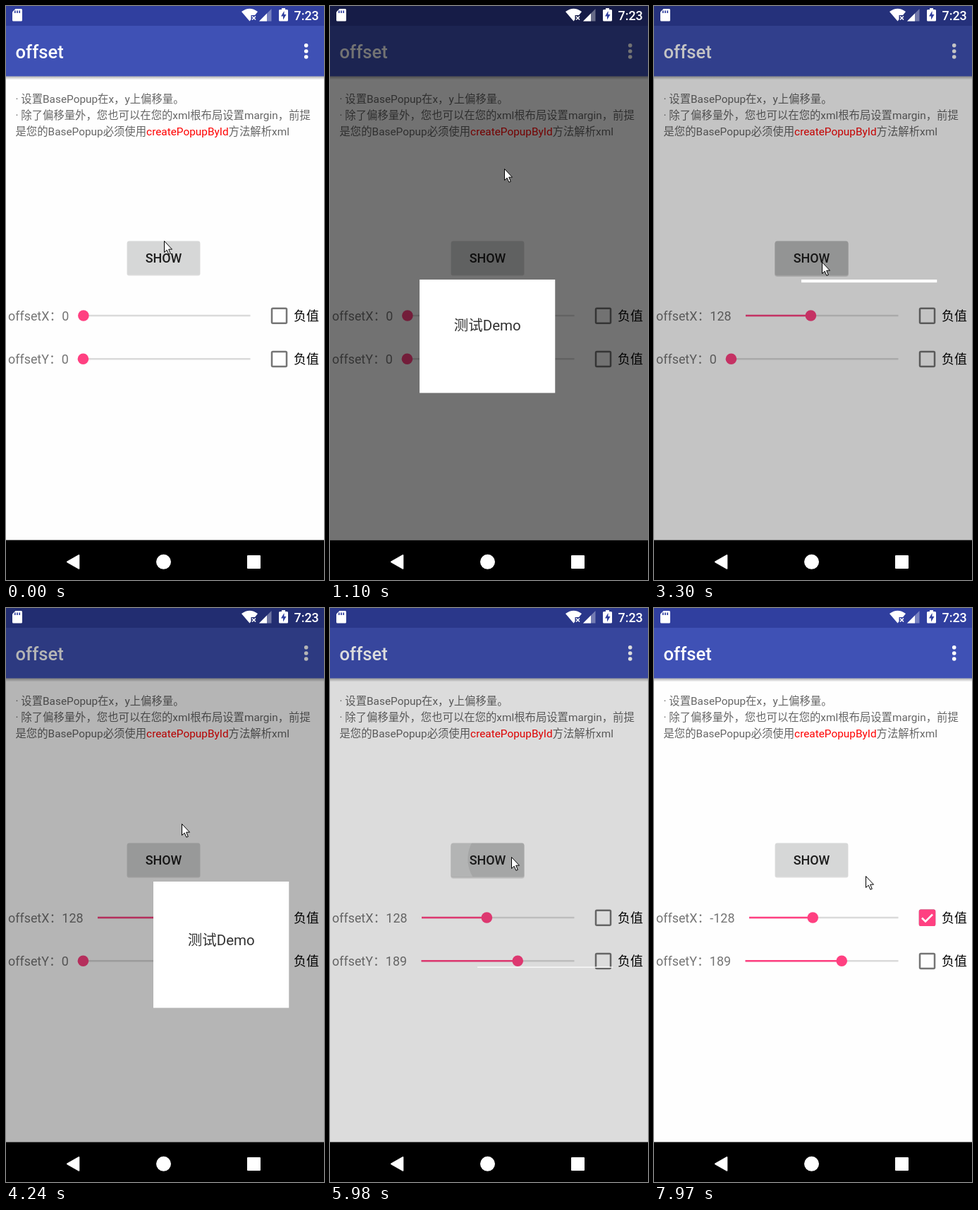
Recreate the animation shown at these times as an HTML page. Size 451x812 px, loop 8 s.

```html
<!DOCTYPE html>
<html lang="zh-CN">
<head>
<meta charset="utf-8">
<title>offset</title>
<style>
  html, body { margin: 0; width: 100%; height: 100%; overflow: hidden; background: #fefefe; }
  svg { display: block; width: 100%; height: 100%; }
  text { font-family: Roboto, "Noto Sans CJK SC", "Noto Sans CJK", sans-serif; font-size: 17.9px; white-space: pre; }
  .note { font-size: 15.36px; fill: #666; }
  .label { fill: #757575; }
  .medium { font-weight: 500; }
  .mid { text-anchor: middle; }
  .accent { fill: #ff4081; }
  .icons { fill: #fff; }
</style>
</head>
<body>
<svg viewBox="0 0 451 812" xmlns="http://www.w3.org/2000/svg">
  <defs>
    <linearGradient id="barShadow" x2="0" y2="1">
      <stop stop-opacity=".3"/><stop offset="1" stop-opacity="0"/>
    </linearGradient>
    <clipPath id="buttonClip"><rect x="172" y="332.5" width="103" height="47.5" rx="2.5"/></clipPath>
    <clipPath id="popupClip"><rect id="popupWindow" width="192.5" height="192"/></clipPath>
  </defs>

  <rect width="451" height="812" fill="#fefefe"/>
  <rect width="451" height="28" fill="#303f9f"/>
  <rect y="28" width="451" height="71.5" fill="#3f51b5"/>
  <rect y="99.5" width="451" height="5" fill="url(#barShadow)"/>
  <text x="13.5" y="74" class="medium" fill="#fff" style="font-size:25.6px">offset</text>
  <g fill="#fff">
    <circle cx="425.7" cy="55.8" r="2.8"/><circle cx="425.7" cy="64" r="2.8"/><circle cx="425.7" cy="72" r="2.8"/>
  </g>

  <text class="note" x="13.5" y="137">· 设置BasePopup在x，y上偏移量。</text>
  <text class="note" x="13.5" y="160">· 除了偏移量外，您也可以在您的xml根布局设置margin，前提</text>
  <text class="note" x="13.5" y="183">是您的BasePopup必须使用<tspan fill="#f00">createPopupById</tspan>方法解析xml</text>

  <rect x="171.5" y="333" width="104" height="48.5" rx="3" opacity=".13"/>
  <rect id="lift" x="171" y="333" width="105" height="50" rx="4" opacity="0"/>
  <rect x="172" y="332.5" width="103" height="47.5" rx="2.5" fill="#d6d7d7"/>
  <g id="ripple" clip-path="url(#buttonClip)">
    <rect x="172" y="332" width="103" height="49" opacity=".035"/>
    <circle id="wave" opacity=".08"/>
  </g>
  <text x="223.5" y="363" class="medium mid" fill="#1c1c1c">SHOW</text>

  <g id="rows"></g>

  <rect id="dim" width="451" height="755.5" opacity="0"/>

  <g class="icons">
    <path d="M13.5 4H21.5Q23 4 23 5.500V20Q23 21.500 21.500 21.500H10.500Q9 21.500 9 20V8.500Z"/>
    <path d="M12.800 6.500v3.500M16 6.500v3.500M19.200 6.500v3.500" stroke="#303f9f" stroke-width="1.700"/>
    <path d="M334 8Q345.500 -.5 357 8L353 13H347.500V19L345.500 21.500Z"/>
    <path d="M349 14.500l5 5m0-5l-5 5" stroke="#fff" stroke-width="1.500"/>
    <path d="M376.500 4V21.500H359Z" opacity=".35"/>
    <path d="M370 10.500V21.500H359Z"/>
    <path d="M387 6.500Q387 5 388.500 5H391V3H396V5H398.500Q400 5 400 6.500V20Q400 21.500 398.500 21.500H388.500Q387 21.500 387 20Z"/>
    <path d="M394.500 7L390 14.500H393V19.500L397.500 12H394.500Z" fill="#303f9f"/>
    <text x="408.500" y="19.500" class="medium">7:23</text>
  </g>

  <g clip-path="url(#popupClip)">
    <g id="popup">
      <rect width="192.5" height="192" fill="#fff"/>
      <text x="96.25" y="103.500" class="mid" fill="#333" style="font-size:20.5px">测试Demo</text>
    </g>
  </g>

  <rect y="755.5" width="451" height="56.5"/>
  <g class="icons" stroke="#fff" stroke-linejoin="round" stroke-width="2">
    <path d="M87 786.300L103.300 777V795.700Z"/>
    <circle cx="223.500" cy="786.300" r="9.500"/>
    <rect x="343" y="778" width="17" height="17"/>
  </g>

  <path id="cursor" d="M.5 .5V16.500L4.200 13.200L6.900 19.300L9.300 18.300L6.700 12.200H11.500Z" fill="#fff" stroke="#000"/>
</svg>

<script>
const LOOP = 8000, DIM = 0.55, SLIDE = 500, POPUP = 192;
const $ = id => document.getElementById(id);
const clamp = x => Math.min(1, Math.max(0, x));
const span = (t, from, to) => clamp((t - from) / (to - from));
const cosine = x => (1 - Math.cos(Math.PI * x)) / 2;
const mix = (a, b, k) => a + (b - a) * k;
const set = (el, attrs) => { for (const k in attrs) el.setAttribute(k, attrs[k]); };

// Pointer moves: start, end, x, y
const cursorStart = [224, 332];
const moves = [
  [45, 200, 221, 345], [375, 420, 219, 348], [820, 1080, 247, 230],
  [1620, 2080, 110, 443], [2290, 2680, 223, 443], [2760, 2980, 238, 371],
  [3050, 3150, 238, 362], [3400, 3650, 249, 305], [4290, 4810, 110, 504],
  [5010, 5430, 267, 504], [5490, 5700, 262, 359], [5860, 5900, 257, 352],
  [6050, 6380, 281, 272], [6940, 7460, 384, 440], [7770, 7970, 300, 379]
];

const shows = [
  { press: 695, open: 734, close: 1520, x: 127, y: 387, tap: [219, 348] },
  { press: 3140, open: 3254, close: 4156, x: 209, y: 387, tap: [238, 362] },
  { press: 5868, open: 5955, close: 6837, x: 209, y: 507.5, tap: [257, 352] }
];

const check = { press: 7685, toggle: 7745 };
const rows = [
  { name: 'offsetX', y: 438, value: 128, press: 2225, from: 2290, to: 2680, release: 2740, check },
  { name: 'offsetY', y: 499.300, value: 189, press: 4955, from: 5010, to: 5430, release: 5470 }
];

for (const row of rows) {
  const g = document.createElementNS('http://www.w3.org/2000/svg', 'g');
  g.setAttribute('transform', `translate(0 ${row.y})`);
  g.innerHTML = `
    <text class="label" x="3" y="6.500"></text>
    <path class="track" stroke="#dadada" stroke-width="2.500"/>
    <path class="fill" stroke="#ff4081" stroke-width="2.500"/>
    <circle class="halo" r="20"/>
    <circle class="thumb accent"/>
    <circle class="press" cx="387.500"/>
    <rect x="377" y="-10.300" width="21" height="21" rx="1.500" fill="none" stroke="#757575" stroke-width="2.500"/>
    <g class="tick" opacity="0">
      <rect class="accent" x="375.800" y="-11.500" width="23.400" height="23.400" rx="2.500"/>
      <path d="M380 .5L385 5.500L395 -4.500" fill="none" stroke="#fff" stroke-width="2.500"/>
    </g>
    <text x="408" y="6.500">负值</text>`;
  $('rows').append(g);
  row.part = {};
  for (const name of ['label', 'track', 'fill', 'halo', 'thumb', 'press', 'tick'])
    row.part[name] = g.querySelector('.' + name);
}

function drawRow(row, t) {
  const p = row.part;
  const value = Math.round(row.value * cosine(span(t, row.from, row.to)));
  const negative = row.check && t >= row.check.toggle;
  const label = `${row.name}：${negative ? -value : value}`;
  if (p.label.textContent !== label) p.label.textContent = label;

  const left = 3 + p.label.getComputedTextLength() + 20.5, right = 346.5;
  const x = mix(left, right, value / 300);
  const held = span(t, row.press, row.press + 100) * (1 - span(t, row.release, row.release + 180));
  set(p.track, { d: `M${left} 0H${right}` });
  set(p.fill, { d: `M${left} 0H${x}` });
  set(p.halo, { cx: x, opacity: 0.12 * held });
  set(p.thumb, { cx: x, r: 7.8 + 3 * held });

  if (row.check) {
    const { press, toggle } = row.check;
    set(p.press, {
      r: 25 * span(t, press, press + 110),
      fill: negative ? '#ff4081' : '#000',
      opacity: (negative ? 0.26 : 0.12) * (1 - span(t, toggle + 40, 7965))
    });
    set(p.tick, { opacity: span(t, toggle, toggle + 90) });
  }
}

function drawPopup(t) {
  const show = shows.filter(s => t >= s.press).pop();
  if (!show) {
    set($('ripple'), { opacity: 0 });
    set($('lift'), { opacity: 0 });
    set($('dim'), { opacity: 0 });
    set($('popupWindow'), { height: 0 });
    return;
  }
  const { press, open, close, x, y, tap } = show;

  const grow = span(t, press, press + 150);
  const pressed = 1 - span(t, open + 100, open + 330);
  set($('ripple'), { opacity: pressed });
  set($('lift'), { opacity: 0.12 * grow * pressed });
  set($('wave'), { cx: mix(tap[0], 223.5, grow * 0.5), cy: mix(tap[1], 356, grow), r: 65 * grow });

  const fadeIn = 1 - (1 - span(t, open, open + 200)) ** 2;
  set($('dim'), { opacity: DIM * fadeIn * (1 - span(t, close, close + 180)) });

  const shown = cosine(span(t, open, open + SLIDE)) - cosine(span(t, close, close + SLIDE));
  set($('popupWindow'), { x, y, height: POPUP });
  set($('popup'), { transform: `translate(${x} ${y - POPUP * (1 - shown)})` });
}

function drawCursor(t) {
  let [x, y] = cursorStart;
  for (const [from, to, nextX, nextY] of moves) {
    const k = cosine(span(t, from, to));
    x = mix(x, nextX, k);
    y = mix(y, nextY, k);
  }
  set($('cursor'), { transform: `translate(${Math.round(x)} ${Math.round(y)})` });
}

const start = performance.now();
function frame() {
  const t = (performance.now() - start) % LOOP;
  rows.forEach(row => drawRow(row, t));
  drawPopup(t);
  drawCursor(t);
  requestAnimationFrame(frame);
}
frame();
</script>
</body>
</html>
```
